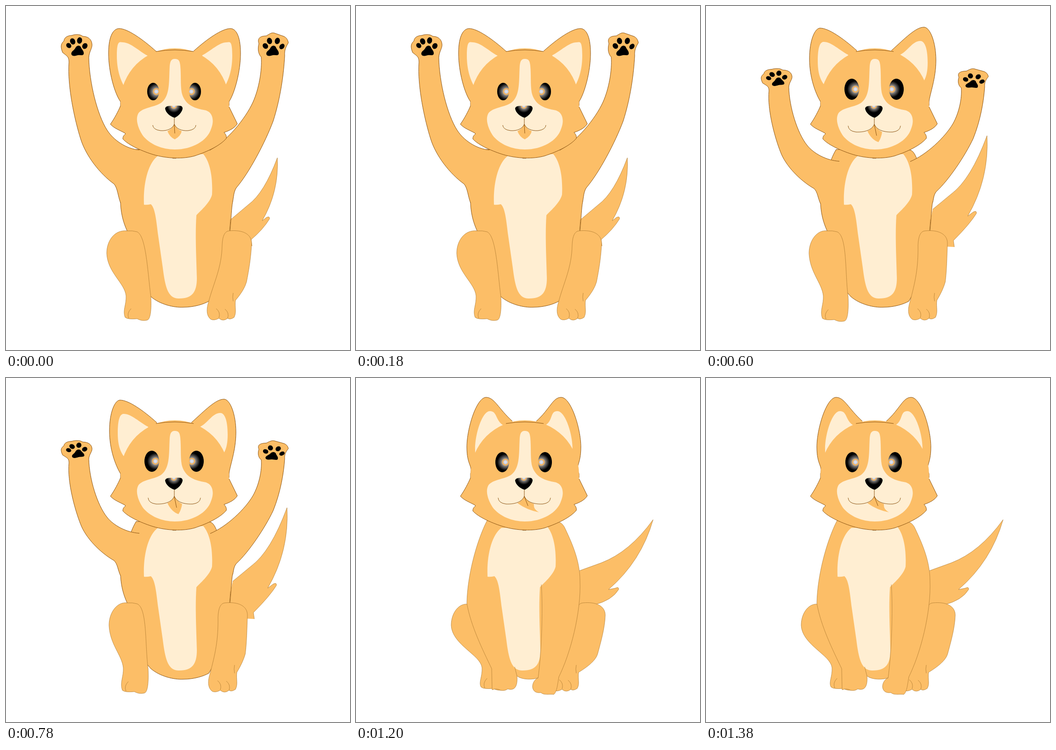
These frames come from a looping animation (748x748 px, 1500 ms). An HTML page:

```html
<!DOCTYPE html>
<html lang="en">
<head>
<meta charset="utf-8">
<title>Waving dog</title>
<style>
  html, body { margin: 0; width: 100%; height: 100%; overflow: hidden; background: #fff; }
  svg { display: block; width: 100vw; height: 100vh; }
  .pose { visibility: hidden; animation: show 1.5s step-end infinite; }
  @keyframes show { 0% { visibility: visible; } 20%, 100% { visibility: hidden; } }
  .fur { fill: #fcbe67; }
  .cream { fill: #ffeed2; }
  .line { fill: none; stroke: #8a5210; stroke-width: 1; vector-effect: non-scaling-stroke; }
  .soft { stroke: #a8742c; stroke-width: .7; }
</style>
</head>
<body>
<svg id="stage" viewBox="0 0 748 748"></svg>
<script>
// ear: [edge x, edge y, tip x, tip y, base x, base y]; the right ear is mirrored.
// tail: root, bend, tip, notch, spike, end.  leg: [thigh shift, foot shift, drop].
// arm: [paw top, vertical scale].  eye: [left x, right x, y, rx, ry].
const poses = [
  { earL: [223, 103, 246, 49, 327, 99], earR: [224, 103, 246, 49, 326, 98],
    tail: [[489, 464], [527, 432], [590, 330], [557, 467], [573, 458], [533, 508]],
    legL: [0, 0, 0], legR: [0, 0, 0], armL: [62, 1], armR: [58, 1],
    eye: [320, 411, 186, 13, 19], shine: [327, 403], smile: 0,
    tongue: [367, 290, 382, 272], crease: [367, 277] },
  { earL: [219, 103, 238, 53, 328, 99], earR: [220, 103, 240, 53, 328, 98],
    tail: [[491, 451], [535, 418], [595, 311], [558, 461], [576, 451], [531, 506]],
    legL: [5, -6, 2], legR: [-9, 3, 0], armL: [106, .885], armR: [107, .876],
    eye: [319, 411, 184, 14, 21], shine: [326, 403], smile: 0,
    tongue: [367, 296, 382, 272], crease: [368, 281] },
  { earL: [225, 115, 248, 48, 328, 97], earR: [234, 118, 260, 46, 331, 97],
    tail: [[493, 442], [533, 409], [611, 282], [569, 457], [588, 446], [538, 510]],
    legL: [5, -6, 2], legR: [-9, 3, 0], armL: [136, .803], armR: [136, .793],
    eye: [317, 414, 181, 16, 23], shine: [325, 404], smile: 1,
    tongue: [375, 296, 383, 274], crease: [371, 282] },
  { earL: [235, 135, 266, 45, 334, 96], earR: [240, 135, 273, 44, 337, 95],
    tail: [[498, 428], [533, 406], [627, 292], [561, 459], [582, 450], [529, 502]],
    legL: [-2, 4, -2], legR: [0, -8, 0], armL: [199, .635], armR: [199, .64],
    eye: [315, 414, 179, 17, 25], shine: [325, 405], smile: 1,
    tongue: [385, 292, 385, 272], crease: [374, 283] },
  { earL: [241, 150, 283, 42, 340, 94], earR: [245, 150, 288, 42, 342, 94], sit: true,
    tail: [[486, 419], [533, 402], [646, 308], [549, 460], [571, 455], [519, 493]],
    legL: [-12, 13, -5], legR: [8, -15, -2],
    eye: [318, 411, 183, 15, 22], shine: [325, 403], smile: 1,
    tongue: [398, 292, 387, 274], crease: [374, 278] }
];

const fill = (d, cls = 'fur') => `<path class="${cls}" d="${d}"/>`;
const line = (d, soft) => `<path class="line${soft ? ' soft' : ''}" d="${d}"/>`;
const part = (d, soft) => fill(d) + line(d, soft);
const oval = (x, y, rx, ry, paint = '#000', turn = 0) =>
  `<ellipse cx="${x}" cy="${y}" rx="${rx}" ry="${ry}" fill="${paint}" transform="rotate(${turn} ${x} ${y})"/>`;

const glow = (id, x, y, r) => {
  const stops = [[0, '#e4e8f2'], [.18, '#cfd6e8'], [.25, '#c9c4c4'], [.28, '#f5b45c'], [.38, '#f0b05c'],
    [.43, '#a39a90'], [.5, '#7d7a78'], [.75, '#3c3b3a'], [1, '#000']];
  return `<radialGradient id="${id}" gradientUnits="userSpaceOnUse" cx="${x}" cy="${y}" r="${r}">` +
    stops.map(([at, c]) => `<stop offset="${at}" stop-color="${c}"/>`).join('') + '</radialGradient>';
};

function tail([root, bend, tip, notch, spike, end]) {
  const [tx, ty] = tip, [nx, ny] = notch, [kx, ky] = spike;
  const cx = (tx + nx) / 2 + (ny - ty) * .15, cy = (ty + ny) / 2 + (tx - nx) * .15;
  const d = `M${root}L${bend}Q${bend[0] * .45 + tx * .55} ${bend[1] * .75 + ty * .25} ${tip}` +
    `Q${cx} ${cy} ${notch}L${kx - 7} ${ky + 2}Q${kx + 1} ${ky - 2} ${kx} ${ky + 5}` +
    `Q${kx - 14} ${ky + 28} ${end}l2 14`;
  return fill(d + 'L500 522L480 500Z') + line(d, true);
}

function leftLeg([a, b, c], sit) {
  const hip = sit ? 243 : 263, hy = sit ? 492 : 489;
  return part(`M${hip} ${hy}C${238 + a} ${hy - 3} ${219 + a} 508 ${219 + a} 538` +
    `C${221 + a} 580 ${258 + b} 602 ${261 + b} 630C${262 + b} 650 ${253 + b} 662 ${259 + b} ${677 + c}` +
    `Q${265 + b} ${682 + c} ${285 + b} ${680 + c}Q${296 + b} ${686 + c} ${307 + b} ${683 + c}` +
    `C${316 + b} ${681 + c} ${316 + b} 650 ${315 + b} 632C${308 + b} 580 ${305 + a * .5} 500 285 491Q275 488 ${hip} ${hy}Z`, true) +
    line(`M${267 + b} ${679 + c}q-5 -11 5 -21`, true);
}

function rightLeg([a, b, c]) {
  const knee = 523 + a * .3;
  return part(`M${440 + b} 645C${452 + b} 600 ${469 + a * .8} 570 ${470 + a} 520Q${471 + a} 490 ${485 + a} 489` +
    `C${515 + a} 486 ${534 + a} 496 ${534 + a} 516C${533 + a} 545 ${528 + a * .5} 575 ${knee} 600` +
    `Q${knee - 5} 618 ${499 + b} 640C${497 + b} 655 ${502 + b} 665 ${496 + b} ${677 + c}` +
    `Q${487 + b} ${683 + c} ${482 + b} ${679 + c}Q${472 + b} ${687 + c} ${463 + b} ${679 + c}` +
    `Q${452 + b} ${685 + c} ${445 + b} ${681 + c}C${434 + b} 672 ${437 + b} 655 ${440 + b} 645Z`, true) +
    line(`M${463 + b} ${678 + c}q4 -12 -6 -20M${482 + b} ${679 + c}q4 -12 -6 -20M${494 + b} 642q-2 -9 0 -18`, true);
}

const pad = 'M142 104C142 98 148 97 151 91C154 85 161 85 163 90C165 95 170 98 169 104C168 109 160 106 156 107C150 109 143 110 142 104Z';

// Arms keep their width and shorten vertically as they come down.
const squash = (top, [y, k], inner) => `<g transform="matrix(1 0 0 ${k} 0 ${y - top * k})">${inner}</g>`;
const lowered = place => place[1] < 1;

function leftArm(place) {
  const d = 'M290 313C262 311 234 292 220 270C198 236 181 165 180 112C181 98 188 92 187 83C186 72 178 66 167 66' +
    'C160 60 148 62 143 64C134 64 126 69 126 76C118 83 119 90 123 101C131 108 137 109 137 122' +
    'C133 175 150 250 162 288C173 325 204 365 235 387C243 397 243 412 249 428';
  return squash(62, place, fill(d + 'L285 385Z') + line(d) +
    `<g transform="rotate(${lowered(place) ? -6 : 0} 156 90)"><path d="${pad}"/>` +
    oval(136.5, 86, 5, 6, '#000', -45) + oval(145, 77, 5.5, 7, '#000', -25) +
    oval(160, 75, 5.5, 7, '#000', 12) + oval(171.5, 87, 5.5, 6.5, '#000', 30) + '</g>');
}

function rightArm(place) {
  const d = 'M444 313C480 294 520 246 537 209C550 180 557 140 555 111C548 104 547 92 550 82C545 68 556 65 566 65' +
    'C574 60 578 57 584 59L604 66C611 69 613 75 614 80C609 88 605 96 606 108C604 147 597 200 581 250' +
    'C564 296 528 364 501 395C495 404 495 415 493 425';
  const turn = lowered(place) ? 'translate(0 3) rotate(8 580 90)' : '';
  return squash(58, place, fill(d + 'L465 400Z') + line(d) + `<g transform="${turn}">` +
    `<path d="${pad}" transform="translate(424)"/>` +
    oval(564, 87, 5.5, 6.5, '#000', -40) + oval(573, 76, 5.5, 7, '#000', -15) +
    oval(590, 76, 5.5, 7, '#000', 15) + oval(600, 88, 5, 6.5, '#000', 40) + '</g>');
}

const standing = 'M283 312C275 325 270 340 265 354L250 420L249 428C250 455 257 475 263 488L300 615L315 632' +
  'C335 649 365 656 385 655C410 655 430 648 441 642L465 600L487 488C490 460 490 440 493 425L480 390L467 357C460 338 455 315 443 313Z';
const sitting = 'M285 310C262 355 242 430 241 490C250 540 275 590 295 632L296 678Q306 674 314 679Q324 681 330 676' +
  'C345 681 352 670 350 648C362 657 385 656 396 652C388 655 383 665 384 673C386 684 395 685 402 684' +
  'C408 690 420 687 430 688C436 684 438 670 441 650C466 600 490 510 487 440C487 398 470 360 456 330Q450 315 440 313Z';
const belly = 'M330 326C309 342 298 385 300 432Q306 433 315 431C325 440 327 470 331 500L341 570C346 610 352 635 374 636' +
  'C405 637 415 622 415 592C414 550 411 500 414 455C420 448 444 428 448 410C450 370 443 338 429 322Z';

function torso(sit) {
  if (!sit) return part(standing) + fill(belly, 'cream') + line('M488 464L486 488', true);
  return part(sitting, true) + `<g transform="translate(-14)">${fill(belly, 'cream')}</g>` +
    line('M345 628L350 648M403 449C407 510 403 600 396 652', true);
}

function ear([x, y, tx, ty, bx, by]) {
  const inner = x + 18, top = ty + 30;
  const d = `M249 217L249 208C${x + 13} 190 ${x} ${y + 40} ${x} ${y}S${(x + tx) / 2} ${ty} ${tx} ${ty}` +
    `C${tx + 18} ${ty} ${bx - 30} ${by - 27} ${bx} ${by}`;
  return fill(d + 'L367 200Z') + line(d) +
    fill(`M${x + 36} 178C${x + 28} 165 ${inner} ${y + 40} ${inner} ${y + 5}S${(inner + tx + 8) / 2} ${top} ${tx + 8} ${top}` +
      `C${tx + 25} ${top} ${bx - 37} ${by} ${bx - 19} ${by + 9}L${bx} 170Z`, 'cream');
}

const jaw = 'M249 217C244 229 236 244 227 257C235 266 247 270 258 276L260 278C256 281 254 284 254 289' +
  'C266 303 300 317 320 323C350 332 385 333 410 326C440 316 466 303 479 288C480 283 478 279 474 275' +
  'C486 271 498 265 503 256L485 219';
const mask = 'M367 115C358 115 357 122 356 130C354 165 357 195 338 210C325 220 298 220 288 233C281 245 286 264 297 281' +
  'C312 301 340 312 367 312C405 312 438 293 446 267C453 250 451 229 430 226C408 222 388 214 382 188C379 170 381 150 379 130C378 120 376 115 367 115Z';
const nose = 'M346 223C347 216 358 217 365 217C375 217 384 215 384 223C383 231 374 240 367 243C358 241 347 232 346 223Z';

function mouth({ smile, tongue: [x, y, rx, ry], crease }) {
  const w = smile * 10, h = smile * 3;
  return fill(`M366 257Q361 268 351 272Q${(351 + x) / 2 - 3} ${y - 5} ${x} ${y}Q${rx - 2} ${(y + ry) / 2 + 2} ${rx} ${ry}Q372 269 366 257Z`) +
    line(`M366 243V258M366 257C362 267 350 ${272 + h} ${336 - w} ${271 + h}Q${320 - w} ${269 + h} ${319 - w} ${259 + h / 2}` +
      `M366 257C370 267 382 ${272 + h} ${396 + w} ${271 + h}Q${412 + w} ${269 + h} ${413 + w} ${259 + h / 2}M366 258L${crease}`);
}

function head(p, i) {
  const [lx, rx, y, w, h] = p.eye;
  return ear(p.earL) + `<g transform="matrix(-1 0 0 1 734 0)">${ear(p.earR)}</g>` +
    '<circle class="fur" cx="367" cy="210" r="118"/>' + part(jaw) + line('M326 99Q367 92 408 99') +
    fill(mask, 'cream') +
    glow('l' + i, p.shine[0], y, 18) + glow('r' + i, p.shine[1], y, 18) + glow('n' + i, 365, 217, 15) +
    oval(lx, y, w, h, `url(#l${i})`) + oval(rx, y, w, h, `url(#r${i})`) +
    mouth(p) + `<path d="${nose}" fill="url(#n${i})"/>` + line('M362 331H370');
}

function dog(p, i) {
  const legs = leftLeg(p.legL, p.sit) + rightLeg(p.legR);
  const body = p.sit ? legs + torso(true) : torso() + legs + leftArm(p.armL) + rightArm(p.armR);
  return `<g class="pose" style="animation-delay:${(i - 5) * 300}ms">${tail(p.tail)}${body}${head(p, i)}</g>`;
}

document.getElementById('stage').innerHTML = poses.map(dog).join('');
</script>
</body>
</html>
```
